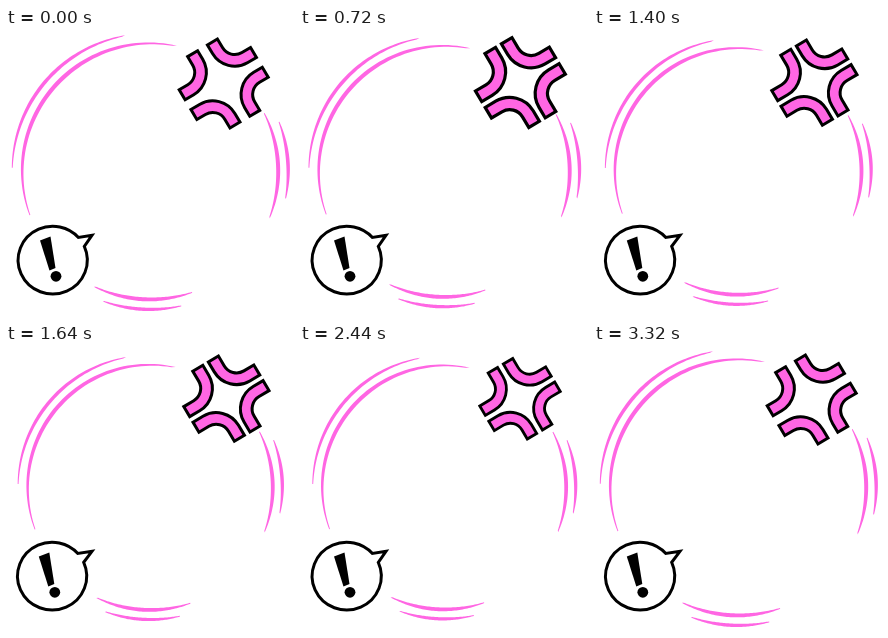
An HTML page with a canvas for the animation above (3440 ms loop, 288 by 288 pixels).

```html
<!DOCTYPE html>
<html lang="en">
<head>
<meta charset="utf-8">
<title>Anger pulse</title>
<style>
html, body { margin: 0; width: 100%; height: 100%; overflow: hidden; background: #fff; }
canvas { display: block; width: 288px; height: 288px; }
</style>
</head>
<body>
<canvas id="stage"></canvas>
<script>
const LOOP = 3440, STEP = 40, FIRST = 120, LAST = 3320;
const TURN = 2240, SETTLED = 3080;
const SIZE = 288, PINK = '#ff66e3', BLACK = '#000', WHITE = '#fff';
const RAD = Math.PI / 180;

const canvas = document.getElementById('stage');
const ctx = canvas.getContext('2d');
const dpr = window.devicePixelRatio || 1;
canvas.width = canvas.height = Math.round(SIZE * dpr);

const clamp = (x) => Math.min(1, Math.max(0, x));
const mix = (a, b, u) => a + (b - a) * u;
const ease = (t, from, to) => {
  const u = clamp((t - from) / (to - from));
  return u * u * (3 - 2 * u);
};

// radius, start and end angle in degrees, greatest thickness
const ARCS = [
  [128, 160, 282, 4.2],
  [138, 181.5, 259.5, 3.6],
  [128, -27, 21.5, 4],
  [138, -21, 11.5, 3.6],
  [128, 70.9, 116, 4],
  [138, 77, 110, 3.4]
];

function taperedArc(radius, from, to, width) {
  const n = 60;
  ctx.beginPath();
  for (let i = 0; i <= 2 * n; i++) {
    const u = i <= n ? i / n : 2 - i / n;
    const half = 0.45 + (width / 2 - 0.45) * Math.sin(Math.PI * u);
    const r = radius + (i <= n ? half : -half);
    const a = mix(from, to, u) * RAD;
    ctx.lineTo(r * Math.cos(a), r * Math.sin(a));
  }
  ctx.closePath();
  ctx.fill();
}

function drawRings(t) {
  const shrink = 0.055 * (1 - Math.pow(1 - clamp(t / TURN), 1.12));
  const scale = 1 - shrink * (1 - ease(t, TURN, SETTLED));
  ctx.save();
  ctx.translate(144.2, 143.4);
  ctx.scale(scale, scale);
  ctx.fillStyle = PINK;
  ARCS.forEach((arc) => taperedArc(...arc));
  ctx.restore();
}

function bend(gap, end, color, width) {
  ctx.beginPath();
  ctx.moveTo(gap, end);
  ctx.arcTo(gap, gap, end, gap, 20);
  ctx.lineTo(end, gap);
  ctx.strokeStyle = color;
  ctx.lineWidth = width;
  ctx.stroke();
}

function drawVein(t) {
  const spread = 1 - ease(t, 80, 400) + ease(t, TURN, SETTLED);
  const wave = Math.cos(2 * Math.PI * (t / 480 - 2 / 3));
  const pulse = 1.006 + 0.076 * Math.tanh(1.6 * wave) / Math.tanh(1.6);
  const scale = mix(pulse, 1, spread);
  const gap = mix(9, 11.5, spread);
  const end = mix(42, 43, spread);
  ctx.save();
  ctx.translate(mix(220.4, 217.7, spread), mix(54.6, 55.5, spread));
  ctx.scale(scale, scale);
  ctx.rotate(59.3 * RAD);
  for (let i = 0; i < 4; i++) {
    bend(gap, end, BLACK, 14.6);
    bend(gap, end - 3, PINK, 8.6);
    ctx.rotate(Math.PI / 2);
  }
  ctx.restore();
}

function drawBubble(t) {
  const shift = Math.floor(t / 120) % 2 ? -1 : 0;
  ctx.save();
  ctx.lineWidth = 3;
  ctx.lineJoin = 'miter';
  ctx.strokeStyle = BLACK;
  ctx.fillStyle = WHITE;
  ctx.beginPath();
  ctx.ellipse(46.7 + shift * 0.6, 232.1, 34.6, 33.9, 0, -24 * RAD, -42 * RAD);
  ctx.lineTo(86, 207.3);
  ctx.closePath();
  ctx.fill();
  ctx.stroke();

  ctx.translate(shift * 1.2, 0);
  ctx.fillStyle = BLACK;
  ctx.beginPath();
  ctx.moveTo(34, 212.5);
  ctx.lineTo(44.5, 208.5);
  ctx.lineTo(49.5, 240);
  ctx.lineTo(43.5, 242.5);
  ctx.closePath();
  ctx.fill();
  ctx.beginPath();
  ctx.arc(50, 248.3, 5.4, 0, 2 * Math.PI);
  ctx.fill();
  ctx.restore();
}

function draw(now) {
  let t = Math.floor((now % LOOP) / STEP) * STEP;
  t = t < FIRST ? 0 : Math.min(t, LAST);
  ctx.setTransform(dpr, 0, 0, dpr, 0, 0);
  ctx.fillStyle = WHITE;
  ctx.fillRect(0, 0, SIZE, SIZE);
  drawRings(t);
  drawVein(t);
  drawBubble(t);
}

const start = performance.now();
function tick() {
  draw(performance.now() - start);
  requestAnimationFrame(tick);
}
tick();
</script>
</body>
</html>
```
